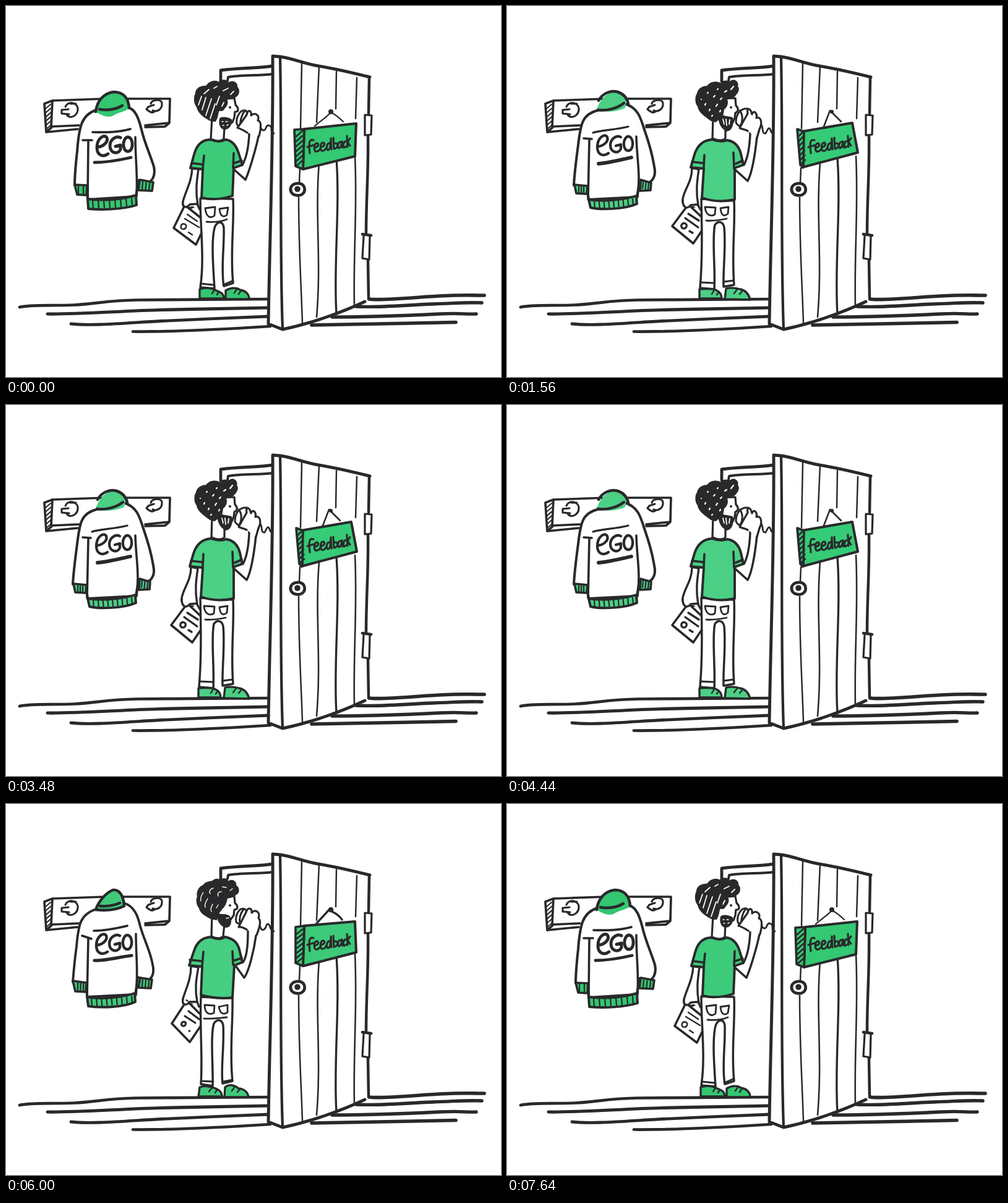
Animation of 800x600 px, one loop 7920 ms. Source, as an HTML page:

```html
<!DOCTYPE html>
<html lang="en">
<head>
<meta charset="utf-8">
<title>Ego and feedback</title>
<style>
html, body { margin: 0; width: 100%; height: 100%; overflow: hidden; background: #fff; }
svg { display: block; width: 100vw; height: 100vh; }
path { stroke-linecap: round; stroke-linejoin: round; }
</style>
</head>
<body>
<svg id="stage" viewBox="0 0 800 600" role="img" aria-label="A man at a door signed feedback, his ego jacket hanging on the wall"></svg>
<script>
const INK = '#29292b', WEIGHT = 1.12;
const line = (d, w = 3.5, fill = 'none', stroke = INK) =>
  `<path d="${d}" fill="${fill}" stroke="${stroke}" stroke-width="${w * WEIGHT}"/>`;
const flat = (d, fill) => `<path d="${d}" fill="${fill}"/>`;
const dot = (x, y, r, fill = INK) => `<circle cx="${x}" cy="${y}" r="${r}" fill="${fill}"/>`;

// n short strokes spread evenly from (x0,y0) to (x1,y1), each running by (dx,dy)
function ribs(x0, y0, x1, y1, n, dx, dy) {
  let d = '';
  for (let i = 0; i < n; i++) {
    const k = i / (n - 1);
    d += `M${x0 + (x1 - x0) * k} ${y0 + (y1 - y0) * k}l${dx} ${dy}`;
  }
  return d;
}

const floor = [
  line('M22 487C40 483 75 485 110 483.5S165 476 210 475.5S330 474 424 474', 4.2),
  line('M67 498C110 499 190 493 250 491.5S380 489 424 488', 4.6),
  line('M105 514C140 518 200 512 250 509.5S380 504 424 502', 4.3),
  line('M205 526.5C270 527 350 523 427 518', 4.2),
  line('M587 474C605 477 660 471 700 469S750 468 773 468', 5),
  line('M566 486C600 488 640 484 690 482S745 479 769 480', 4.8),
  line('M527 503C600 503 660 500 700 498S740 499 760 498', 4.8),
  line('M494 516C560 515 650 513 727 511.5', 5)
].join('');

const board = [
  flat('M75 152L265 150L264 189L257 195L65 204L62 158Z', '#fff'),
  line('M75 153L160 150L265 150L264 189M75 153L73 195L118 193M225 193L264 189L257 195L225 196M62 158L75 153M62 158L65 204L116 199M74 196L65 204', 3.3),
  line(ribs(64, 166, 64, 200, 6, 8, -7), 1.9),
  line('M96 163C99 154 114 155 116 165C117 177 104 184 98 176M101 167L90 168L90 174L102 175M104 158L113 158', 2.8),
  line('M234 158C236 151 251 150 252 157C253 167 244 172 237 169M239 160L230 163L227 167C233 172 237 174 241 170', 2.8)
].join('');

const door = [
  line('M347 122L347 104C375 100 405 101 431 97', 4.3),
  line('M358 121L359 115C380 111 410 113 431 110', 3.5),
  flat('M431 81L443 82C485 94 540 102 588 115L585 474L580 478C540 497 490 514 447 523L424 514C426 380 431 230 431 81Z', '#fff'),
  line('M588 115C560 108 535 102 505 97C480 93 465 85 443 82L431 81C432 230 426 380 424 514L447 523C490 514 540 497 580 478', 4.4),
  line('M443 82C446 230 442 390 447 522', 3.8),
  line('M587 117L586 174M585 208C586 270 582 310 582 368M585 411L586 474', 4),
  line('M478 92L476 198M506 97L502 188M534 106L533 166M567 116L565 182M475 262L474 285M473 310C473 390 477 450 479 512', 2.2),
  line('M506 254C499 340 510 410 502 503M564 243C568 330 561 400 563 487', 2.3),
  line('M534 246C540 330 529 420 534 498', 3),
  line('M580 176L591 177L590 208L580 209Z', 2.9, '#fff'),
  line('M578 372L576 408L587 410L588 372', 2.9, '#fff'),
  line('M576 369L590 371', 4.2),
  line('M461 292C466 285 479 285 482 293C485 302 477 308 469 306C461 305 458 298 461 292Z', 4.2, '#fff'),
  dot(471, 296, 4.8)
].join('');

const ego = 'M148 228C155 228 166 221 163 213C159 206 147 214 147 229C147 242 157 245 165 239' +
  'M185 213C178 209 168 216 168 226C168 238 181 241 185 232L185 225L177 227' +
  'M196 212C187 216 188 236 198 235C207 233 206 211 196 212';
const feedback = 'M497 217C490 214 489 222 491 238M487 228L497 225' +
  'M499 229C505 228 506 223 503 222C498 221 497 232 500 235C503 236 506 234 508 231' +
  'M509 228C515 227 516 222 513 221C508 220 507 231 510 234C513 235 516 233 517 230' +
  'M524 222C518 221 517 231 520 233C524 233 525 226 525 214L526 232' +
  'M529 213L530 231M530 223C537 219 538 229 531 231' +
  'M542 220C536 219 535 229 538 230C542 229 543 221 543 219L544 229' +
  'M550 219C545 218 544 228 547 229L550 227M551 210L552 228M556 214L552 220L556 226';

const poses = [
  {
    green: '#34c671', shirtGreen: '#3dcb7a', signGreen: '#34c872',
    jacket: 'M146 168C122 176 118 195 115 235C112 262 111 275 111 290L131 291L132 313L210 308L214 282L230 286C240 280 241 270 239 260C233 240 224 222 219 200C214 180 209 168 198 164Z',
    seams: 'M124 217L139 217M133 217L132 312M209 212C209 250 213 270 211 308',
    jacketWidth: 3.6,
    collar: 'M145 171C147 153 158 141 174 139C190 139 199 149 199 165C194 171 180 172 172 178C164 181 154 177 145 171Z',
    collarLines: 'M145 171C147 153 158 141 174 139C190 139 198 149 199 165M151 167C165 170 180 166 188 161',
    cuffs: 'M111 289L131 290L130 306L115 305ZM216 281L238 285L236 299L214 298Z',
    cuffRibs: ribs(117, 291, 125, 291, 2, 0, 13) + ribs(221, 285, 232, 287, 3, -1, 11),
    hem: 'M132 312C160 316 190 312 210 306L211 322C190 329 155 330 133 328Z',
    hemRibs: ribs(140, 315, 203, 311, 8, 1, 13),
    egoLines: line('M140 204C158 204 180 205 201 199', 3.3) + line('M143 253C160 253 180 250 202 245', 4.3),
    egoShift: '0 0', egoWidth: 4.4,
    arm: 'M301 262C300 285 290 300 286 316C284 325 291 328 300 326L310 322C306 300 308 285 311 264Z',
    card: 'M289 322L324 350L307 386L271 359Z',
    cardMarks: 'M293 337L309 348M289 344L312 358M283 355C286 350 293 353 291 358C288 363 281 361 283 355M295 366L301 370',
    cardWidth: 2.2,
    thumb: 'M286 317C285 325 291 328 297 321L309 320L313 329',
    pants: 'M314 311C314 360 321 410 314 455L337 457C335 425 331 375 338 356C343 347 351 348 352 359C353 390 347 425 352 453L367 448C362 400 369 355 367 312Z',
    pockets: 'M322 327L338 325L337 339C331 344 323 342 322 327M345 328L359 326L357 338C352 342 346 341 345 328M324 349C335 350 347 349 357 345M315 449L335 451M351 451L367 444',
    shoes: 'M313 473L313 458C321 455 331 456 335 458C342 462 352 462 352 473ZM355 474L355 460C363 455 373 455 378 459C386 460 393 465 393 474Z',
    laces: 'M333 465L337 459M341 467L344 462M369 464L373 458M376 466L380 460',
    shirt: 'M331 216C340 220 348 220 355 216C368 218 373 228 376 238L382 257L368 262L366 307C350 312 331 314 316 310L318 264L298 262L304 240C308 225 317 216 331 216Z',
    shirtLines: 'M318 263L320 242M367 262L368 238M300 254L316 256M369 254L381 250',
    forearm: 'M368 264L387 281C394 265 404 230 408 211L411 196L392 190L393 207C392 230 389 245 382 257',
    hand: 'M390 205C384 201 378 198 374 197L389 176C391 166 397 169 396 177C402 171 411 177 407 185C414 187 412 199 409 210',
    cup: 'M387 169C378 167 371 181 373 191C377 198 384 194 388 183C390 175 390 170 387 169ZM386 169C380 177 378 188 379 193',
    knob: 'M411 196C415 204 419 201 420 197C423 190 429 193 429 200C429 205 431 206 433 206',
    neck: 'M333 180L331 215C340 219 348 219 352 215L353 194L366 188L369 180L370 171C377 171 376 165 371 160L369 149L340 150Z',
    hair: 'M333 186C322 181 311 173 309 163C304 157 304 147 307 142C307 133 316 129 324 130C328 122 338 120 344 124C349 118 357 120 359 125C366 120 374 124 373 131C378 136 376 144 370 147C365 152 359 149 356 151C360 157 355 163 352 166C350 172 345 166 343 170C342 176 341 182 338 186Z',
    glints: 'M311 160L316 146M317 168L323 148M323 177L332 150M330 182L338 158M320 142L328 135M340 160L345 146M351 137L359 133M349 162L352 156M363 143L368 138M336 133L341 130',
    glintWidth: 1.6,
    beard: 'M346 182C350 179 360 181 364 184C365 191 361 198 354 199C347 199 344 191 346 182Z',
    teeth: 'M349 187L351 187M355 187L358 187M350 193L352 193M357 193L359 192', teethWidth: 1.3,
    signFront: 'M482 199L566 190L564 243L480 264Z', signSide: 'M466 200L482 199L480 264L468 259Z',
    signRibs: ribs(469, 211, 469, 259, 7, 10, -9),
    string: 'M499 194C508 186 518 180 525 172C533 176 540 182 545 187', stringWidth: 2, nail: 4,
    textTurn: 0
  },
  {
    green: '#3fca7a', shirtGreen: '#47ce82', signGreen: '#3cca78',
    jacket: 'M146 170C120 178 117 195 114 230C110 260 109 275 108 288L130 291L131 312L209 308L213 280L229 286C240 279 239 268 237 260C234 240 224 222 217 198C213 180 207 165 190 160Z',
    seams: 'M123 213L138 218M133 216L131 312M210 210C210 250 214 268 210 309',
    jacketWidth: 3.4,
    collar: 'M145 171C149 159 160 144 173 139C184 138 190 149 191 165C177 172 163 173 145 171Z',
    collarLines: 'M145 171C149 159 160 144 173 139C184 138 190 149 191 165C177 172 163 173 145 171M152 165C164 166 175 164 184 160',
    cuffs: 'M108 286L130 289L129 304L112 303ZM217 281L236 284L234 298L214 297Z',
    cuffRibs: ribs(116, 289, 125, 290, 3, 0, 13) + ribs(221, 284, 231, 286, 3, -1, 11),
    hem: 'M131 312C155 317 190 312 208 306L209 320C190 329 155 330 133 327Z',
    hemRibs: ribs(138, 315, 203, 311, 9, 1, 12),
    egoLines: line('M142 205C155 205 175 202 196 197', 3.3) + line('M143 253C160 254 180 248 203 245', 4.6),
    egoShift: '-1 0', egoWidth: 4,
    arm: 'M299 262C299 285 290 300 286 315C284 323 291 326 298 324L309 320C305 300 307 285 311 264Z',
    card: 'M292 318L322 348L297 385L268 355Z',
    cardMarks: 'M295 335L312 348M289 343L306 354M284 354C287 350 292 353 290 357C288 361 282 359 284 354M296 367L297 367',
    cardWidth: 2.8,
    thumb: 'M286 316C284 325 291 327 297 320L309 320L312 328',
    pants: 'M315 312C313 360 318 410 315 453L334 456C335 425 330 375 336 355C341 347 349 348 351 358C353 390 347 425 350 452L366 448C361 400 367 355 366 314Z',
    pockets: 'M322 325L337 326L336 338C329 341 321 340 321 325M344 328L358 325L358 337C352 341 346 340 344 328M320 347C333 348 345 346 357 345M316 448L335 449M350 449L365 446',
    shoes: 'M311 473L313 458C320 455 330 457 336 459C344 462 349 465 349 473ZM353 474L354 458C361 452 370 455 376 460C386 461 391 467 392 474Z',
    laces: 'M328 465L333 459M338 467L341 462M365 464L369 458M374 466L378 461',
    shirt: 'M331 215C340 219 348 219 354 215C368 218 374 224 377 235L382 256L369 261L366 313C350 315 330 313 315 309L317 263L296 261L304 237C309 222 318 216 331 215Z',
    shirtLines: 'M317 262L319 239M367 260L366 238M297 252L316 254M369 253L381 249',
    forearm: 'M372 263L385 281C393 270 401 235 404 213L410 194L391 190L391 207C391 230 389 248 383 256',
    hand: 'M389 203C384 200 380 198 376 199L388 175C391 166 398 168 397 176C402 169 412 175 408 184C413 190 410 199 405 212',
    cup: 'M386 170C377 166 370 180 372 191C377 197 384 192 387 183C389 175 389 171 386 170ZM384 170C378 178 377 187 378 193',
    knob: 'M411 199C414 207 418 203 420 199C422 190 426 195 427 200C429 205 431 206 433 206',
    neck: 'M333 178L332 214C340 218 347 218 351 214L353 194L363 187L368 180L369 171C376 170 375 165 370 160L369 149L340 150Z',
    hair: 'M331 185C324 181 314 176 313 168C308 163 308 154 310 150C308 141 313 134 319 132C323 125 331 126 334 125C339 120 344 122 347 124C351 119 357 121 359 126C366 121 372 126 371 132C378 137 376 144 371 146C367 152 361 150 357 152C356 157 355 164 349 169L342 178L340 187Z',
    glints: 'M315 157C313 151 317 146 319 143M322 167C320 161 324 157 326 153M332 174C329 169 333 165 334 162M330 145C327 141 331 137 335 136M343 149C341 145 344 141 348 142M350 134L356 135M362 140L366 137M340 168L343 163',
    glintWidth: 1.2,
    beard: 'M342 177C348 181 355 177 361 182C365 188 363 199 356 199C347 198 341 188 342 177Z',
    teeth: 'M356 185L360 184', teethWidth: 1.2,
    signFront: 'M482 197L564 190L566 240L480 262Z', signSide: 'M468 199L482 197L480 262L468 257Z',
    signRibs: ribs(470, 210, 469, 257, 7, 10, -8),
    string: 'M502 193L524 169M527 174C533 177 540 182 543 187', stringWidth: 3, nail: 4.3,
    textTurn: 0.4
  },
  {
    green: '#4bcf84', shirtGreen: '#4bd085', signGreen: '#36cb76',
    jacket: 'M146 169C122 175 119 190 115 225C111 255 109 270 108 290L129 292L132 313L210 309L214 284L229 286C240 280 240 268 238 260C235 240 229 220 222 200C216 180 211 164 190 158Z',
    seams: 'M124 214L137 215M133 216L131 312M209 211C210 250 216 270 211 309',
    jacketWidth: 3.6,
    collar: 'M145 167C150 152 161 139 176 138C189 139 195 148 191 165C180 170 160 174 145 167Z',
    collarLines: 'M148 153C155 140 169 136 179 139C188 142 194 149 196 158M147 168C160 170 178 166 189 157',
    cuffs: 'M109 289L130 291L129 304L112 303ZM216 281L233 286L232 298L215 299Z',
    cuffRibs: ribs(116, 292, 124, 293, 3, 0, 10) + ribs(220, 285, 229, 287, 3, -1, 10),
    hem: 'M132 313C155 317 190 313 209 307L210 320C190 329 150 330 135 326Z',
    hemRibs: ribs(141, 316, 203, 312, 9, 1, 11),
    egoLines: line('M139 205C150 201 178 200 196 195', 2.8) + line('M148 255C164 254 182 249 201 245', 5.2),
    egoShift: '-1 -1', egoWidth: 3.8,
    arm: 'M299 262C299 285 287 295 284 312C283 323 288 326 296 327L309 322C305 300 307 285 310 264Z',
    card: 'M293 321L324 350L301 384L267 356Z',
    cardMarks: 'M293 336L310 347M288 343L309 358M282 354C285 349 292 352 290 357C288 362 280 360 282 354M295 364L300 367',
    cardWidth: 3,
    thumb: 'M284 314C284 325 290 330 297 322L308 321L313 330',
    pants: 'M314 312C315 360 316 410 312 456L335 458C337 425 331 375 336 354C341 347 349 348 351 358C354 390 349 425 350 454L367 451C363 400 369 355 367 315Z',
    pockets: 'M320 325L337 326L336 337C330 341 321 339 320 325M345 327L358 325L357 336C351 341 346 339 345 327M322 347C333 348 345 346 355 344M313 447L334 448M350 446L366 444',
    shoes: 'M311 473L311 458C320 458 330 456 337 459C344 462 347 466 347 473ZM352 474L354 457C361 455 370 456 377 458C387 460 391 467 393 475Z',
    laces: 'M331 466L335 459M339 467L343 462M367 465L372 458M376 466L381 460',
    shirt: 'M331 216C340 219 348 220 356 217C368 219 375 227 378 239L382 257L368 262L368 313C350 317 331 316 315 310L318 263L297 261L303 240C308 225 317 217 331 216Z',
    shirtLines: 'M318 261L319 241M367 263L366 237M299 252L316 254M370 255L381 250',
    forearm: 'M369 265L389 283C397 268 402 230 404 211L409 196L391 193L393 207C392 230 388 248 383 257',
    hand: 'M389 202C384 199 378 199 376 197L389 174C387 164 393 164 396 175C399 167 405 174 403 181C411 178 413 190 408 199L404 213',
    cup: 'M389 166C378 165 370 174 370 188C373 196 384 197 390 192C394 183 392 174 389 166ZM376 169C382 176 381 187 377 194',
    knob: 'M411 192C415 197 411 207 418 206C421 201 423 193 426 201C427 206 431 206 430 206',
    neck: 'M333 182L332 214C340 218 350 218 353 214L353 198L365 188L368 181L369 173C375 170 374 165 370 161L369 149L340 150Z',
    hair: 'M330 185C322 179 310 172 309 162C304 156 305 146 308 142C309 134 317 130 324 130C329 122 340 122 346 126C350 119 358 122 360 123C367 117 374 123 372 130C377 136 370 143 367 146C361 150 357 146 355 151C357 157 356 162 350 167L348 178L337 187Z',
    glints: 'M314 151L314 151M320 160L321 158M327 169L328 167M334 147L336 145M324 141L325 140M338 162L340 159M331 178L332 177M345 151L347 149M340 135L341 134M352 139L355 137M362 135L366 130M344 171L345 169',
    glintWidth: 2,
    beard: 'M342 174C347 180 355 178 364 181C366 192 363 201 355 202C347 197 342 191 342 174Z',
    teeth: 'M349 183L351 191M354 183L355 193M360 184L359 191', teethWidth: 1.6,
    signFront: 'M477 203L558 189L567 237L477 261Z', signSide: 'M469 199L480 203L479 261L474 257Z',
    signRibs: ribs(471, 211, 475, 256, 7, 7, -7),
    string: 'M512 195L522 169L540 187', stringWidth: 2.3, nail: 3,
    textTurn: -0.4
  }
];

const drawJacket = p => [
  line(p.jacket, p.jacketWidth, '#fff'),
  line(p.seams, 3.2),
  flat(p.collar, p.green),
  line(p.collarLines, 4),
  line(p.cuffs, 3.2, p.green),
  line(p.hem, 3.5, p.green),
  line(p.cuffRibs + p.hemRibs, 2),
  p.egoLines,
  `<g transform="translate(${p.egoShift})">${line(ego, p.egoWidth)}</g>`
].join('');

const drawMan = p => [
  line(p.arm, 3, '#fff'),
  line(p.card, 3.2, '#fff'),
  line(p.cardMarks, p.cardWidth),
  line(p.thumb, 3, '#fff'),
  line(p.pants, 3.1, '#fff'),
  line(p.pockets, 2.5),
  line(p.shoes, 3, p.green),
  line(p.laces, 2.2),
  line(p.neck, 2.9, '#fff'),
  line(p.forearm, 3.1, '#fff'),
  line(p.shirt, 3.5, p.shirtGreen),
  line(p.shirtLines, 3.2),
  line(p.hair, 2, INK),
  line(p.glints, p.glintWidth, 'none', '#fff'),
  dot(362, 164, 2),
  line(p.beard, 1.8, INK),
  line(p.teeth, p.teethWidth, 'none', '#fff'),
  line(p.cup, 2.7, '#fff'),
  line(p.hand, 2.9, '#fff'),
  line(p.knob, 2.5)
].join('');

const drawSign = p => [
  line(p.string, p.stringWidth),
  dot(525, 171, p.nail),
  line(p.signFront, 3.6, p.signGreen),
  line(p.signSide, 3.3, p.signGreen),
  line(p.signRibs, 2.4),
  `<g transform="rotate(${p.textTurn} 522 225)">${line(feedback, 2.8)}</g>`
].join('');

const stage = document.getElementById('stage');
stage.innerHTML = floor + board + door +
  poses.map(p => `<g class="pose">${drawJacket(p)}${drawMan(p)}${drawSign(p)}</g>`).join('');
const groups = stage.querySelectorAll('.pose');

const LOOP = 7920, CYCLE = 960, LEAD = 40;

// Each cycle holds the three poses for 280, 360 and 320 ms; the first one ends late.
function poseAt(t) {
  const phase = t < CYCLE ? Math.min(t + LEAD, CYCLE - 1) : (t + LEAD) % CYCLE;
  return phase < 280 ? 0 : phase < 640 ? 1 : 2;
}

const start = performance.now();
function update(now) {
  const shown = poseAt(Math.max(0, now - start) % LOOP);
  groups.forEach((g, i) => g.setAttribute('visibility', i === shown ? 'visible' : 'hidden'));
  requestAnimationFrame(update);
}
update(start);
</script>
</body>
</html>
```
